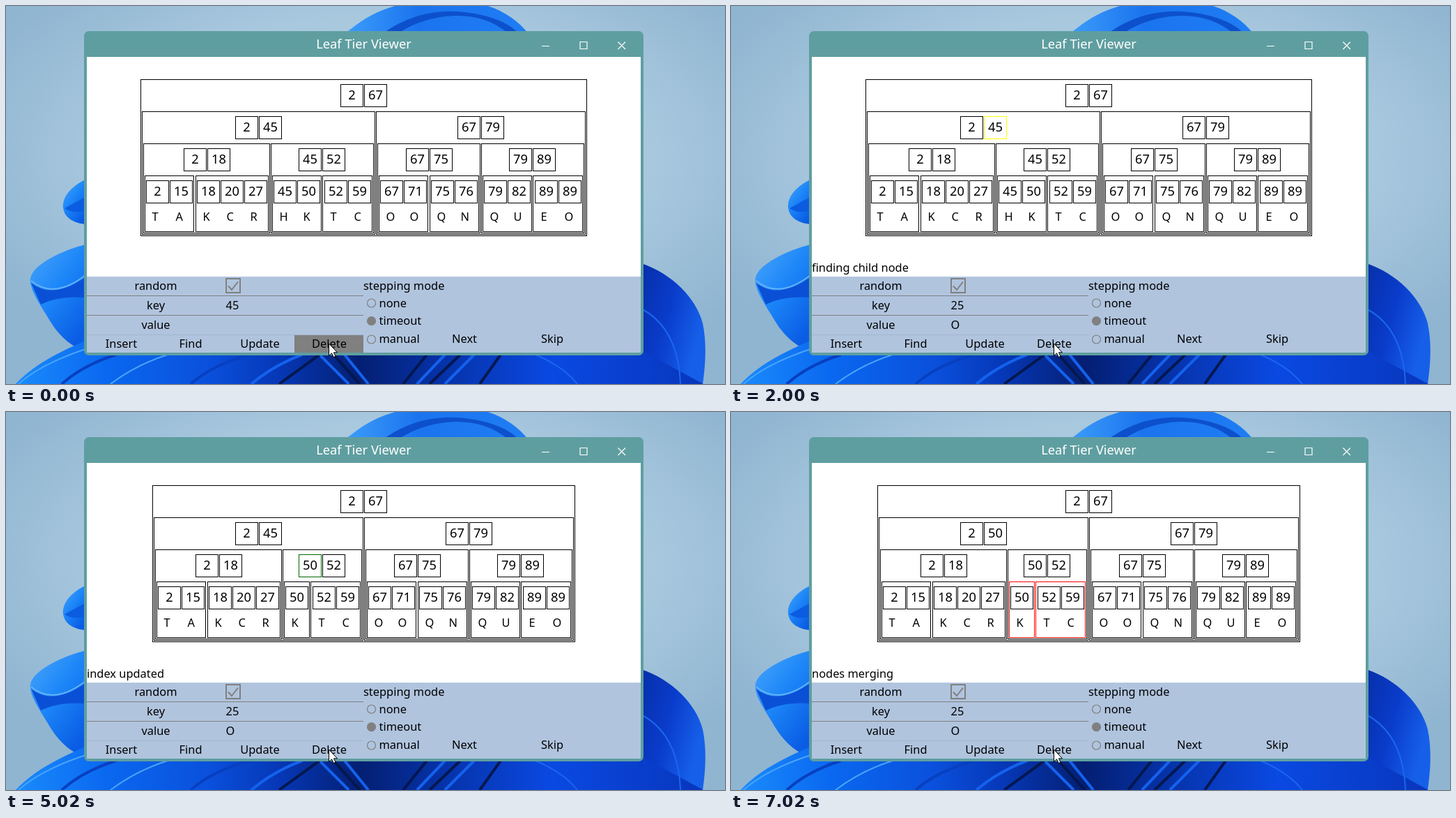
Animation of 1032x542 px, one loop 8 s. Source, as an HTML page:

```html
<!DOCTYPE html>
<html lang="en">
<head>
<meta charset="utf-8">
<title>Leaf Tier Viewer</title>
<style>
  html, body { margin: 0; width: 100%; height: 100%; overflow: hidden; }
  svg { display: block; width: 1032px; height: 542px; font: 16.4px "Noto Sans", "Open Sans", sans-serif; }
  .mid { text-anchor: middle; }
  .big { font-size: 18.3px; text-anchor: middle; }
  .box { fill: none; stroke: #000; }
  .grey { fill: none; stroke: #808080; }
</style>
</head>
<body>
<svg viewBox="0 0 1032 542">
  <defs>
    <radialGradient id="sky" cx=".52" cy=".4" r=".62">
      <stop stop-color="#b6d2e4"/><stop offset=".6" stop-color="#a8c8de"/><stop offset="1" stop-color="#90b5d1"/>
    </radialGradient>
    <linearGradient id="arch">
      <stop stop-color="#3c9dfa"/><stop offset=".4" stop-color="#1b74ee"/><stop offset="1" stop-color="#1f7df4"/>
    </linearGradient>
    <linearGradient id="petal" x2=".7" y2="1">
      <stop stop-color="#4aa6fb"/><stop offset=".5" stop-color="#1c86f8"/><stop offset="1" stop-color="#0a5ce4"/>
    </linearGradient>
    <linearGradient id="right" x2="1" y2=".4">
      <stop stop-color="#052a9c"/><stop offset=".6" stop-color="#0a3ccb"/><stop offset="1" stop-color="#165fe8"/>
    </linearGradient>
    <linearGradient id="floor">
      <stop stop-color="#1a8bfc"/><stop offset=".13" stop-color="#0a68f0"/><stop offset=".28" stop-color="#0a50dc"/>
      <stop offset=".38" stop-color="#0638b8"/><stop offset=".5" stop-color="#041f72"/><stop offset=".62" stop-color="#0632a8"/>
      <stop offset=".78" stop-color="#0a49e2"/><stop offset="1" stop-color="#0836bc"/>
    </linearGradient>
  </defs>

  <rect width="1032" height="542" fill="url(#sky)"/>
  <path fill="url(#arch)" d="M486 40C510 20 530 8 558 0H692C716 8 736 22 750 40Z"/>
  <path fill="#0d50cc" d="M540 40C576 14 612 6 648 8S722 22 736 40H722C700 22 676 14 648 14S588 22 562 40Z"/>
  <path fill="url(#petal)" d="M114 249C96 257 80 273 82 289S98 311 114 313Z"/>
  <path fill="#0b5ce0" d="M114 274C100 281 92 286 84 290C94 297 104 296 114 293Z"/>
  <path fill="url(#petal)" d="M114 342C82 350 38 370 35 391C33 407 50 429 64 453C78 476 97 490 114 495Z"/>
  <path fill="#0a50d6" d="M36 397C60 416 88 407 114 389V418C88 416 66 420 50 428Z"/>
  <path fill="none" stroke="#63b3fb" stroke-width="2" d="M36 394C60 414 88 406 114 386"/>
  <path fill="url(#right)" d="M912 369C956 384 990 418 1000 455C1006 484 1004 514 1000 542H890Z"/>
  <path fill="url(#floor)" d="M14 542C34 520 66 500 114 480L140 494H912L1001 542Z"/>
  <g fill="none" stroke-width="4">
    <path stroke="#4aa5fb" stroke-width="2" d="M18 542C40 522 72 506 114 492M150 542C174 524 200 510 232 500"/>
    <path stroke="#0740c0" d="M80 542C100 524 126 510 158 500M265 542C290 520 320 508 350 500"/>
    <path stroke="#1462ee" d="M352 542C376 522 398 510 425 500M450 500L492 542M486 500L520 542M630 500L590 542M672 500L630 542"/>
    <path stroke="#031850" d="M392 542L450 500M470 500L508 542M604 500L570 542M652 500L608 542M710 500L680 542"/>
    <path stroke="#1c66ee" stroke-width="2" d="M760 500C784 510 806 524 820 542M912 434C946 452 966 488 968 542"/>
  </g>

  <rect x="112" y="36" width="803" height="465" rx="7" fill="#5f9ea0"/>
  <path fill="#fff" d="M116 73H911V388H116Z"/>
  <path fill="#b0c4de" d="M116 388H911V497H116Z"/>
  <text class="big" x="513.5" y="61" fill="#fff">Leaf Tier Viewer</text>
  <path fill="none" stroke="#fff" stroke-width="1.2" d="M769 57.5H780M824 51.5H834V61.5H824ZM878.5 51.5L889 62M889 51.5L878.5 62"/>
  <path class="grey" d="M116 415.5H513M116 443.5H513"/>
  <path stroke="#a3b6cf" d="M116 471.5H513"/>
  <path class="grey" stroke-width="2" d="M316 391H336V411H316ZM319 401.5L324 407L333 395.5"/>
  <g class="grey" stroke-width="1.2">
    <circle cx="524.5" cy="426" r="6"/>
    <circle cx="524.5" cy="451.7" r="6" fill="#808080"/>
    <circle cx="524.5" cy="478" r="6"/>
  </g>
  <g class="mid">
    <text x="215" y="407">random</text><text x="215" y="435">key</text><text x="215" y="463">value</text>
    <text x="658" y="483">Next</text><text x="784" y="483">Skip</text>
  </g>
  <text x="513" y="407">stepping mode</text>
  <text x="535.5" y="432">none</text><text x="535.5" y="457">timeout</text><text x="535.5" y="483">manual</text>
  <g id="live"></g>
  <g class="mid">
    <text x="165.5" y="490">Insert</text><text x="265" y="490">Find</text>
    <text x="364.5" y="490">Update</text><text x="464" y="490">Delete</text>
  </g>
  <path fill="#fff" stroke="#000" d="M463.5 484V501.5L467.5 497.8L470.3 503.5L473 502.2L470.4 496.8H475.5Z"/>
</svg>
<script>
const LOOP = 8000, GAP = 2.14, PITCH = 34, ROW = 46, TOP = 105.5, MIDDLE = 513.5;

// Root > index nodes > leaves; each leaf lists its keys with their values.
const makeTree = third => [
  [["2T 15A", "18K 20C 27R"], [third, "52T 59C"]],
  [["67O 71O", "75Q 76N"], ["79Q 82U", "89E 89O"]],
];
const before = makeTree("45H 50K"), after = makeTree("50K");

// Marks are "depth-column" for cells and "leaf-number" for leaf boxes.
const find = "finding child node", updated = "index updated";
const steps = [
  { at: 0, tree: before, note: "", key: 45, value: "", hover: true },
  { at: 1000, tree: before, note: find, marks: { "0-0": "#ff0" } },
  { at: 2000, tree: before, note: find, marks: { "1-1": "#ff0" } },
  { at: 3000, tree: before, note: find, marks: { "2-2": "#ff0" } },
  { at: 4020, tree: before, note: "deleting node", marks: { "3-5": "#f00" } },
  { at: 5020, tree: after, note: updated, marks: { "2-2": "#006400" }, stale: { "1-1": 45 } },
  { at: 6020, tree: after, note: updated, marks: { "1-1": "#006400" } },
  { at: 7020, tree: after, note: "nodes merging", marks: { "leaf-2": "#f00", "leaf-3": "#f00" } },
];

const isLeaf = node => typeof node === "string";
const firstKey = node => isLeaf(node) ? parseInt(node) : firstKey(node[0]);
const widthOf = node => isLeaf(node)
  ? node.split(" ").length * PITCH + GAP
  : node.reduce((sum, child) => sum + widthOf(child) + GAP, GAP);
const snap = x => Math.floor(x - .1) + .5;
const text = (x, y, content, cls = "") => `<text class="${cls}" x="${x}" y="${y}">${content}</text>`;
const box = (x, y, w, h, colour = "#000") =>
  `<rect class="box" x="${x}" y="${y}" width="${w}" height="${h}" style="stroke:${colour}"/>`;

function drawTree({ tree, marks = {}, stale = {} }) {
  const columns = [0, 0, 0, 0];
  let leaves = 0;

  function drawNode(node, left, depth) {
    const width = widthOf(node), y = TOP + depth * ROW, x = snap(left);
    const leaf = isLeaf(node);
    const items = leaf ? node.split(" ") : node;
    const colour = leaf ? marks["leaf-" + leaves++] : undefined;
    let out = box(x, y, snap(left + width) - x, 329 - 2 * depth - y + .5, colour);
    const start = left + (width - items.length * PITCH + GAP) / 2;
    items.forEach((item, i) => {
      const id = depth + "-" + columns[depth]++, cellX = snap(start + i * PITCH);
      out += box(cellX, y + 7, 32, 32, marks[id]);
      out += text(cellX + 16, y + 28, stale[id] ?? firstKey(item), "big");
      if (leaf) out += text(cellX + 8, y + 64, item.slice(-1));
    });
    if (!leaf) {
      let childX = left + GAP;
      for (const child of node) {
        out += drawNode(child, childX, depth + 1);
        childX += widthOf(child) + GAP;
      }
    }
    return out;
  }
  return drawNode(tree, MIDDLE - widthOf(tree) / 2, 0);
}

function drawStep(step) {
  const { note, key = 25, value = "O", hover } = step;
  return (hover ? '<path fill="#808080" d="M414 472H513V497H414Z"/>' : "") +
    drawTree(step) + text(116, 381, note) + text(315.5, 435, key) + text(315.5, 463, value);
}

const live = document.getElementById("live");
let shown;
function frame() {
  const time = performance.now() % LOOP;
  const step = steps.findLast(s => s.at <= time);
  if (step !== shown) live.innerHTML = drawStep(shown = step);
  requestAnimationFrame(frame);
}
frame();
</script>
</body>
</html>
```
